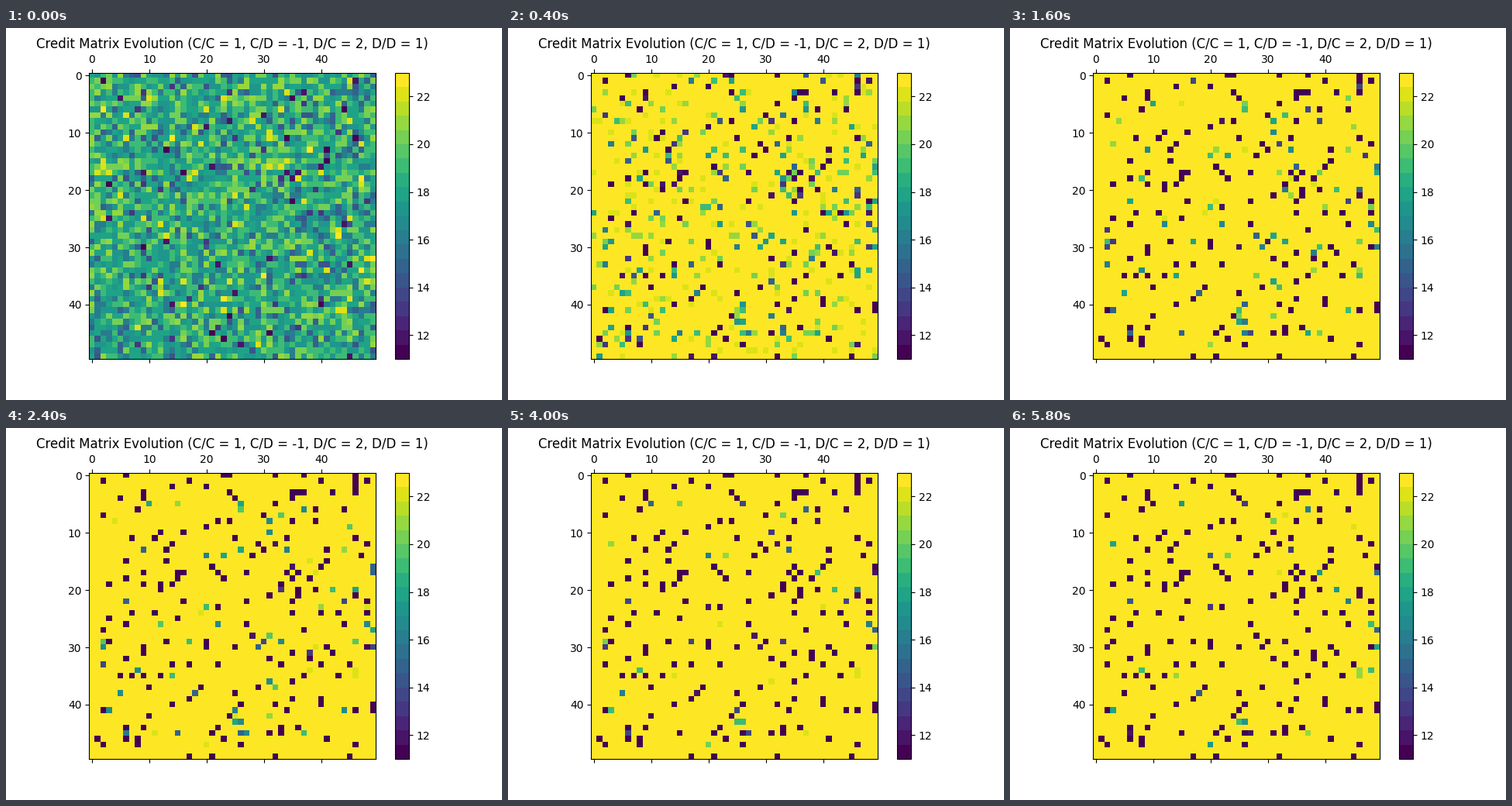
These frames come from a looping animation (640x480 px, 6 s). A matplotlib script:

```python
import numpy as np
import matplotlib.pyplot as plt
from matplotlib.animation import FuncAnimation

SIZE = 50
STEPS = 30
INTERVAL = 200
LOW, HIGH = 11, 23


def credit_history(seed=7):
    """Credits of every player at each step, shape (STEPS, SIZE, SIZE)."""
    rng = np.random.default_rng(seed)
    shape = (SIZE, SIZE)
    kind = rng.random(shape)
    loser = kind < 0.065
    drifter = (kind >= 0.065) & (kind < 0.11)

    start = np.where(loser, rng.normal(14, 2.3, shape),
                     rng.normal(18.3, 1.75, shape))
    start = np.clip(start, LOW, HIGH)

    # Most players gain quickly, a few lose, some wander in between.
    gain = rng.normal(4.2, 1.0, shape).clip(1.5)
    gain = np.where(loser, rng.uniform(-3, -0.8, shape), gain)
    gain = np.where(drifter, rng.normal(0, 0.5, shape), gain)
    spread = np.where(loser, 0.4, np.where(drifter, 0.9, 1.2))

    change = gain + spread * rng.normal(size=(STEPS - 1, *shape))
    walk = np.concatenate([np.zeros((1, *shape)), np.cumsum(change, axis=0)])
    return np.rint(start + walk)


history = credit_history()

fig, ax = plt.subplots(figsize=(6.4, 4.8), dpi=100)
image = ax.matshow(history[0], cmap=plt.get_cmap("viridis", 20),
                   vmin=LOW, vmax=HIGH)
fig.colorbar(image, ax=ax)
ax.set_title("Credit Matrix Evolution (C/C = 1, C/D = -1, D/C = 2, D/D = 1)")


def update(step):
    image.set_data(history[step])
    return [image]


anim = FuncAnimation(fig, update, frames=STEPS, interval=INTERVAL,
                     repeat=True, repeat_delay=0)
plt.show()
```
